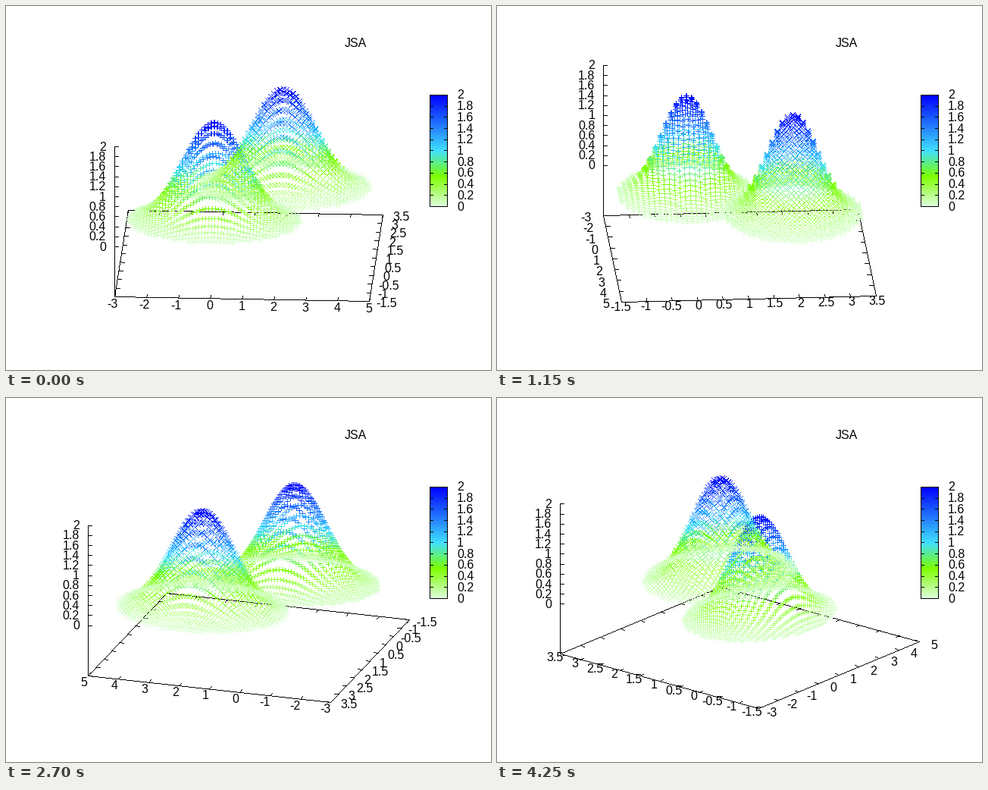
Animation, 640 px wide and 480 px high, one loop 4.3 s. Source, as a matplotlib script:

```python
import numpy as np
import matplotlib.pyplot as plt
from matplotlib.animation import FuncAnimation
from matplotlib.colors import LinearSegmentedColormap

W, H, DPI = 640, 480, 100
FRAMES, INTERVAL = 86, 50
FONT_SIZE = 16 * 72 / DPI
plt.rcParams["font.family"] = "Liberation Sans"
plt.rcParams["text.hinting"] = "native"

X0, X1, Y0, Y1 = -3, 5, -1.5, 3.5
CX, CY = 320, 329                  # screen centre of the floor
SX, SY, SZ = 336.8, 114.3, 66      # floor width, floor depth, height per z unit
SPACE = 4.4                        # blank in front of non-negative labels

cmap = LinearSegmentedColormap.from_list(
    "bells", [(0, "#e0ffe0"), (0.27, "#7cff00"), (0.5, "#40e0ff"), (1, "#0000ff")])

fig = plt.figure(figsize=(W / DPI, H / DPI), dpi=DPI, facecolor="white")
ax = fig.add_axes([0, 0, 1, 1])
ax.axis("off")


def project(x, y, z, t):
    """Orthographic view, turned by t about the vertical axis."""
    u, v = (x - (X0 + X1) / 2) / (X1 - X0), (y - (Y0 + Y1) / 2) / (Y1 - Y0)
    c, s = np.cos(t), np.sin(t)
    return CX + SX * (u * c + v * s), CY + SY * (u * s - v * c) - SZ * (z + 1)


def line(img, p, q):
    """Hard-edged black line, one pixel wide."""
    p, q = np.round(p), np.round(q)
    n = int(np.abs(q - p).max()) + 1
    x, y = np.round(np.linspace(p, q, n)).astype(int).T
    img[y, x] = 0


def write(x, y, s="", ha="left"):
    return ax.text(x, y + 5.5, s, ha=ha, va="baseline", fontsize=FONT_SIZE, color="black")


def place(label, x, y, ha):
    pad = 0 if label.get_text().startswith("-") else SPACE
    x += {"left": pad, "center": pad / 2, "right": 0}[ha]
    label.set_position((x, y + 5.5))
    label.set_ha(ha)


# Two bells sampled on a grid, kept where they rise above the floor
gx, gy = np.meshgrid(np.arange(-30, 31) / 10, np.arange(-15, 16) / 10, indexing="ij")
gz = 2 * np.exp(-gx ** 2 / 2 - 2 * gy ** 2)
keep = gz >= 0.05
bx, by, bz = gx[keep], gy[keep], gz[keep]
px, py, pz = np.r_[bx, bx + 2], np.r_[by, by + 2], np.r_[bz, bz]
colors = cmap(pz / 2)[:, None, :3]

# Marker pixels: "+" on the first bell, "x" on the second
arm, zero = np.arange(-3, 4), np.zeros(7, int)
plus = np.r_[arm, zero], np.r_[zero, arm]
cross = np.r_[arm, arm], np.r_[arm, -arm]
mark_x, mark_y = (np.repeat([a, b], len(bx), axis=0) for a, b in zip(plus, cross))

xticks = np.arange(X0, X1 + 1)
yticks = np.arange(-3, 8) / 2
zticks = np.arange(11) / 5
xlabels, ylabels, zlabels = ([write(0, 0, f"{v:g}") for v in ticks]
                             for ticks in (xticks, yticks, zticks))

# Title and colour bar
write(476, 48, "JSA", "right")
L, T, R, B = 559, 117, 582, 264
backdrop = np.ones((H, W, 3))
backdrop[T:B + 1, L:R + 1] = cmap(np.linspace(1, 0, B - T + 1))[:, None, :3]
for p, q in (((L, T), (R, T)), ((R, T), (R, B)), ((R, B), (L, B)), ((L, B), (L, T))):
    line(backdrop, p, q)
for v in zticks:
    y = B - (B - T) * v / 2
    line(backdrop, (L, y), (L + 4, y))
    line(backdrop, (R - 4, y), (R, y))
    write(590.5 + SPACE, y, f"{v:g}")

screen = ax.imshow(backdrop, extent=(0, W, H, 0), interpolation="nearest", aspect="auto")
ax.set_xlim(0, W)
ax.set_ylim(H, 0)


def outward(dx, dy):
    """Unit direction of a floor edge, pointing towards the viewer."""
    d = np.array([dx, dy / 2])
    return d / np.hypot(*d)


def align(dx, limit):
    return "left" if dx > limit else "right" if dx < -limit else "center"


def draw(n):
    deg = (n + 1) * 360 // 100
    t = np.radians(deg)
    c, s = np.cos(t), np.sin(t)
    quad = deg // 90 % 4
    front_y, back_y = (Y1, Y0) if quad in (1, 2) else (Y0, Y1)
    front_x, back_x = (X1, X0) if quad in (0, 1) else (X0, X1)
    img = backdrop.copy()

    def at(x, y, z=-1):
        return np.array(project(x, y, z, t))

    floor = ((X0, Y0), (X1, Y0), (X1, Y1), (X0, Y1))
    for i in range(4):
        line(img, at(*floor[i]), at(*floor[(i + 1) % 4]))

    # x axis
    k = 1 if front_y == Y1 else -1
    d = outward(k * s, -k * c)
    tick = d * (5.5, 4)
    ha = align(d[0], 0.9)
    reach = {"left": 11.5, "center": 10.3, "right": 16}[ha]
    shift = -1.3 if ha == "center" else 0
    for v, label in zip(xticks, xlabels):
        p, q = at(v, front_y), at(v, back_y)
        line(img, p, p - tick)
        line(img, q, q + tick)
        place(label, p[0] + d[0] * reach + shift, p[1] + d[1] * 7.3 + 2.4, ha)

    # y axis
    k = 1 if front_x == X1 else -1
    d = outward(k * c, k * s)
    tick = d * (5.5, 4)
    ha = align(d[0], 0.97)
    reach = {"left": 8.7, "center": 8.3, "right": 13}[ha]
    shift = -1.8 if ha == "center" else 0
    for v, label in zip(yticks, ylabels):
        p, q = at(front_x, v), at(back_x, v)
        line(img, p, p - tick)
        line(img, q, q + tick)
        place(label, p[0] + d[0] * reach + shift, p[1] + d[1] * 4.7 + 2, ha)

    # z axis stands on the leftmost corner
    corner = floor[quad]
    line(img, at(*corner), at(*corner, 2))
    for v, label in zip(zticks, zlabels):
        p = at(*corner, v)
        line(img, p, p + (5, 0))
        place(label, p[0] - 11, p[1], "right")

    x, y = (np.round(a).astype(int)[:, None] for a in project(px, py, pz, t))
    img[y + mark_y, x + mark_x] = colors
    screen.set_data(img)
    return [screen, *xlabels, *ylabels, *zlabels]


anim = FuncAnimation(fig, draw, frames=FRAMES, interval=INTERVAL,
                     init_func=lambda: draw(0), repeat=True, repeat_delay=0, blit=False)
plt.show()
```
